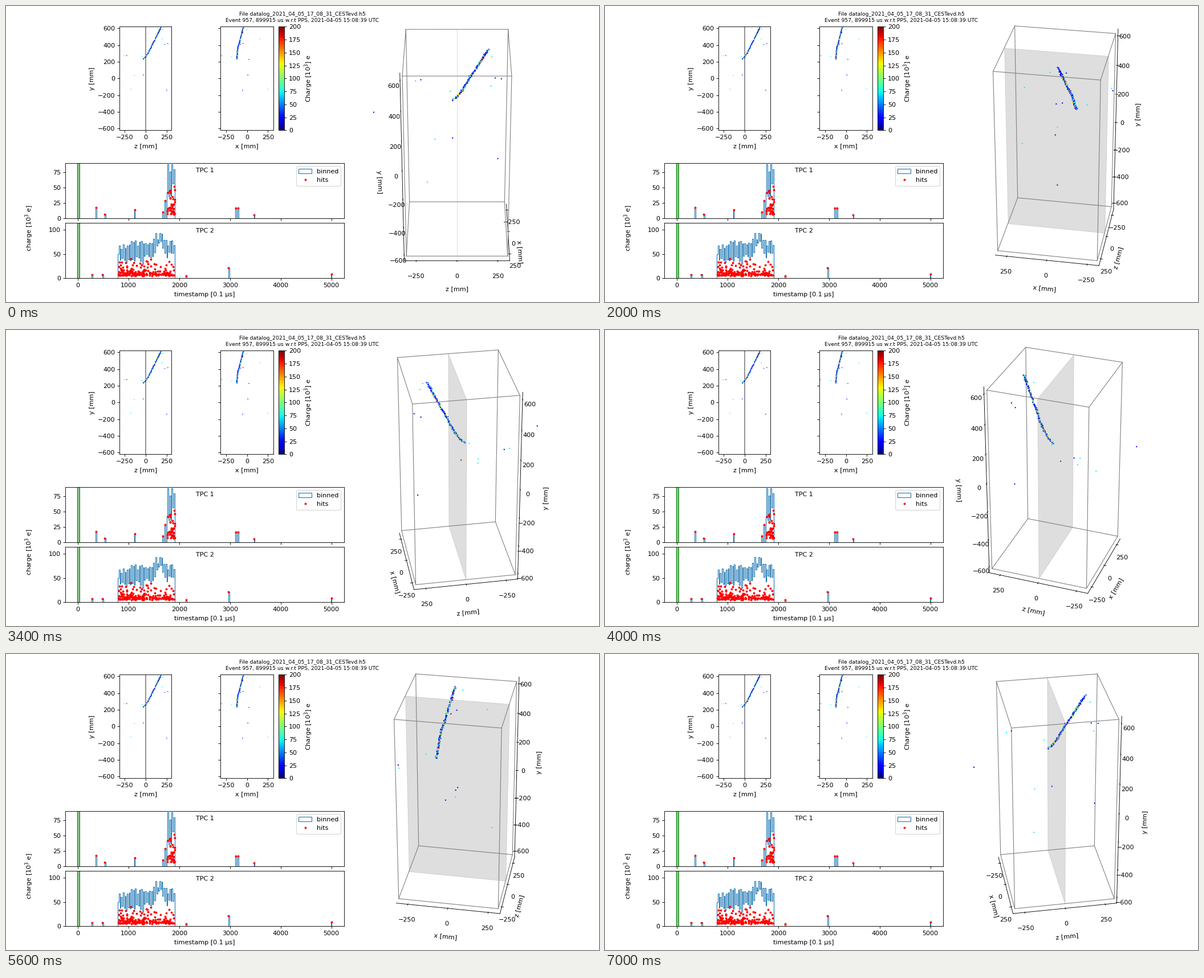
A matplotlib script for the animation above (7200 ms loop, 1040 by 520 pixels).

```python
from itertools import combinations, product

import matplotlib.pyplot as plt
import numpy as np
from matplotlib.animation import FuncAnimation
from mpl_toolkits.mplot3d.art3d import Poly3DCollection

W, H, DPI = 1040, 520, 80
FRAMES, INTERVAL = 36, 200
HALF, HALF_Y = 310, 620
rng = np.random.default_rng(957)

plt.rcParams["font.family"] = "DejaVu Sans"
fig = plt.figure(figsize=(W / DPI, H / DPI), dpi=DPI, facecolor="white")


def px_axes(left, top, right, bottom, **kw):
    """Axes placed by pixel edges, y counted from the top of the stage."""
    rect = [left / W, 1 - bottom / H, (right - left) / W, (bottom - top) / H]
    return fig.add_axes(rect, **kw)


def make_hits(n=230):
    """A bent track plus a few stray hits, as x, y, z and charge."""
    y = np.linspace(615, 234, n) + rng.normal(0, 3, n)
    x = np.interp(y, [234, 357, 445, 615], [-121, -112, -87, -44])
    z = np.interp(y, [234, 262, 309, 615], [-27, 5, 34, 185])
    x, z = (v + rng.normal(0, 3, n) for v in (x, z))
    q = np.clip(12 + rng.exponential(46, n), 0, 190)
    dim = [(-312, 275, -224), (22, 228, -499), (-78, 408, 229),
           (-48, 418, 265), (9, 43, -27), (-53, -140, 252)]
    bright = [(-300, 273, -257), (-182, 262, -41), (14, 37, -134),
              (246, -126, -177), (0, 588, 204), (151, 473, 198)]
    track = np.array([x, y, z])
    spots = np.hstack([track, np.array(dim + bright).T])
    return *spots, np.r_[q, np.full(len(dim), 25), np.full(len(bright), 72)]


x, y, z, charge = make_hits()
shade = dict(c=charge, cmap="jet", vmin=0, vmax=200)

fig.suptitle("File datalog_2021_04_05_17_08_31_CESTevd.h5\n"
             "Event 957, 899915 us w.r.t PPS, 2021-04-05 15:08:39 UTC",
             fontsize="small")

# Flat projections
ax_zy = px_axes(199.2, 36.4, 290.4, 218.4)
ax_xy = px_axes(376.2, 36.4, 469.2, 218.4)
for ax, across, name, half in ((ax_zy, z, "z", 310), (ax_xy, x, "x", 316)):
    dots = ax.scatter(across, y, s=0.6, linewidths=0.5, zorder=3, **shade)
    ax.set(xlim=(-half, half), ylim=(-HALF_Y, HALF_Y), xlabel=f"{name} [mm]",
           xticks=[-250, 0, 250], yticks=range(-600, 601, 200))
ax_zy.axvline(0, color="gray")
ax_zy.set_ylabel("y [mm]")
ax_xy.tick_params(labelleft=False)
bar = fig.colorbar(dots, cax=px_axes(478.2, 36.4, 488.2, 218.4),
                   ticks=range(0, 201, 25))
bar.set_label("Charge [10$^3$] e")

# Charge against time
BIN = 20
edges = np.arange(-10, 5251, BIN)


def comb(n, low, high, peak=0):
    """Bin heights that jump between two levels, with a late bump."""
    i = np.arange(n)
    bump = peak * np.exp(-((i - 0.72 * n) / (0.12 * n)) ** 2)
    return np.where(i % 2, high, low) + bump + rng.normal(0, 6, n)


def cluster_hits(n, t0, t1, low, spread, high):
    q = low + rng.exponential(spread, n)
    return rng.uniform(t0, t1, n), np.where(q > high, low + 3, q)


def draw_tpc(ax, name, start, heights, single, cluster, top, step):
    binned = np.zeros(len(edges) - 1)
    for t, q in single:
        binned[(t + 10) // BIN] = q
    first = (start + 10) // BIN
    binned[first:first + len(heights)] = heights
    ax.hist(edges[:-1], edges, weights=binned, histtype="step",
            color="C0", label="binned")
    ax.plot(*np.hstack([np.transpose(single), cluster]), "r.", ms=5,
            label="hits")
    for trigger in (0, 31):
        ax.axvline(trigger, color="green")
    ax.set(xlim=(-245, 5251), ylim=(0, top), yticks=range(0, top, step),
           xticks=range(0, 5001, 1000))
    ax.text(0.5, 0.86, name, transform=ax.transAxes, ha="center", va="center")


ax_t1 = px_axes(104.1, 275.8, 592.9, 373.1)
ax_t2 = px_axes(104.1, 380.9, 592.9, 478.3)
draw_tpc(ax_t1, "TPC 1", 1750, comb(8, 42, 81),
         [(360, 18), (530, 7), (1125, 14), (1680, 10), (1720, 29),
          (3120, 17), (3160, 17), (3470, 6)],
         cluster_hits(40, 1755, 1925, 7, 15, 52), 90, 25)
draw_tpc(ax_t2, "TPC 2", 790, comb(56, 42, 68, 28),
         [(285, 7), (490, 7), (2140, 5), (2975, 21), (5000, 9)],
         cluster_hits(190, 795, 1900, 5.5, 9, 43), 114, 50)
ax_t1.legend(loc="upper right")
ax_t2.set_xlabel("timestamp [0.1 µs]", labelpad=5.5)
fig.text(41 / W, 1 - 390 / H, "charge [10$^3$ e]", rotation=90,
         ha="center", va="center")

# Rotating detector box: the vertical axis carries y
ax3d = px_axes(564, 26.2, 1006, 468.2, projection="3d")
ax3d.patch.set_visible(False)
ax3d.grid(False)
for axis in (ax3d.xaxis, ax3d.yaxis, ax3d.zaxis):
    axis.pane.set_visible(False)

size = np.array([HALF, HALF, HALF_Y])
corners = [size * c for c in product((-1, 1), repeat=3)]
for a, b in combinations(corners, 2):
    if np.count_nonzero(a != b) == 1:
        ax3d.plot(*zip(a, b), color="gray", lw=1)

cathode = [(sx * HALF, 0, sy * HALF_Y)
           for sx, sy in ((-1, -1), (1, -1), (1, 1), (-1, 1))]
veil = (0.5, 0.5, 0.5, 0.26)
ax3d.add_collection3d(Poly3DCollection(
    [cathode], facecolor=veil, edgecolor=veil, linewidth=0.8))
ax3d.scatter(x, z, y, s=1, depthshade=False, **shade)

ax3d.set(xticks=[-250, 0, 250], yticks=[-250, 0, 250],
         zticks=range(-600, 601, 200), xlabel="x [mm]", ylabel="z [mm]")
ax3d.set_zlabel("y [mm]", labelpad=20)
# Axis lines sit slightly outside the drawn box
limits = np.outer(size, (-25 / 24, 25 / 24))
ax3d.set(xlim=limits[0], ylim=limits[1], zlim=limits[2])
ax3d.set_box_aspect((1, 1, 2))
ax3d.viewLim.intervalx = (-0.095, 0.09)
ax3d.viewLim.intervaly = (-0.095, 0.09)


def update(frame):
    # A tiny offset settles which side the axes take in edge-on views
    ax3d.view_init(elev=30, azim=frame * 360 / FRAMES + 0.01)
    return []


anim = FuncAnimation(fig, update, frames=FRAMES, interval=INTERVAL,
                     init_func=lambda: update(0), repeat=True)
plt.show()
```
